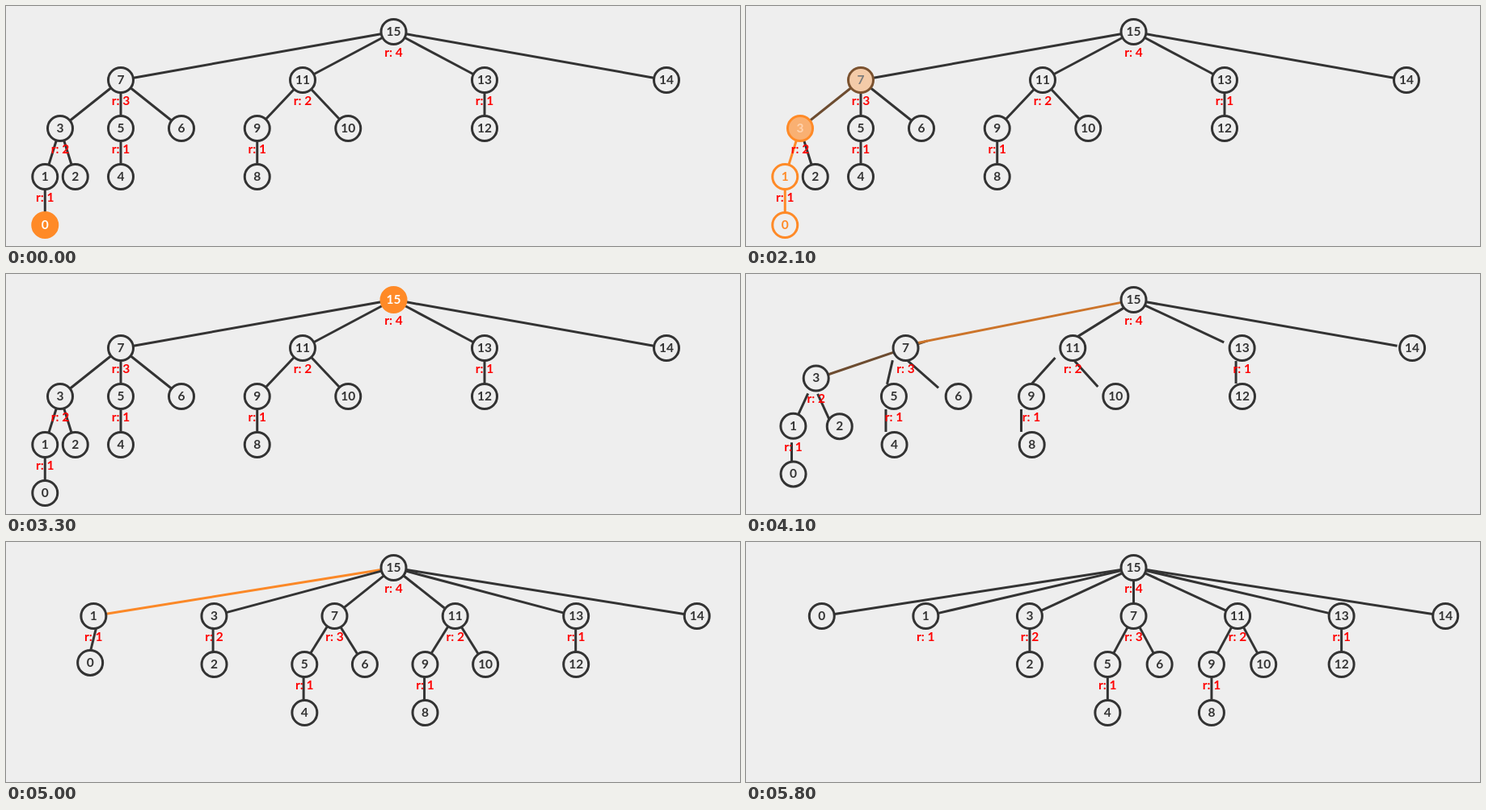
Write an HTML page that moves like this. It is 908 px wide and 298 px high and loops after 6.6 s.

```html
<!DOCTYPE html>
<html lang="en">
<head>
<meta charset="utf-8">
<title>Path compression</title>
<style>
  html, body { margin: 0; width: 100%; height: 100%; overflow: hidden; background: #eee; }
  svg { display: block; width: 908px; height: 298px; }
  circle, line { stroke-width: 3; }
  text { font: bold 15.5px Lato, "Open Sans", sans-serif; text-anchor: middle; }
  .rank { fill: #f00; }
</style>
</head>
<body>
<svg id="stage" viewBox="0 0 908 298"></svg>
<script>
const LOOP = 6600, TICK = 100;
const STEP = 500, FIRST = 421, DURATION = 388;
const ROOT = 15, LEFT = 29.5, WIDTH = 900, TOP = 32, ROW = 60, RADIUS = 16;
const PATH = [0, 1, 3, 7, ROOT];
const RANKS = { 1: 1, 3: 2, 5: 1, 7: 3, 9: 1, 11: 2, 13: 1, 15: 4 };

const PAPER = [238, 238, 238], INK = [51, 51, 51], ORANGE = [255, 138, 39], WHITE = [255, 255, 255];
const NORMAL = { fill: PAPER, stroke: INK, text: INK };
const VISITED = { fill: PAPER, stroke: ORANGE, text: ORANGE };
const ACTIVE = { fill: ORANGE, stroke: ORANGE, text: WHITE };

// Every child gets an equal share of its parent's width.
function layout(parents) {
  const spots = [];
  (function place(id, left, width, depth) {
    spots[id] = [left + width / 2, TOP + ROW * depth];
    const children = [...parents.keys()].filter(child => parents[child] === id);
    const share = width / children.length;
    children.forEach((child, i) => place(child, left + i * share, share, depth + 1));
  })(ROOT, LEFT, WIDTH, 0);
  return spots;
}

function edgeBetween([x1, y1], [x2, y2]) {
  const length = Math.hypot(x2 - x1, y2 - y1);
  const dx = (x2 - x1) / length * RADIUS, dy = (y2 - y1) / length * RADIUS;
  return [x1 + dx, y1 + dy, x2 - dx, y2 - dy];
}

function makeStep(parents, active, visited, hotEdges) {
  const spots = layout(parents);
  return {
    nodes: spots.map((at, id) => ({
      at, ...(id === active ? ACTIVE : visited.includes(id) ? VISITED : NORMAL)
    })),
    edges: parents.map((parent, id) => ({
      ends: edgeBetween(spots[id], spots[parent]),
      color: hotEdges.includes(id) ? ORANGE : INK
    }))
  };
}

function makeSteps() {
  const parents = [1, 3, 3, 7, 5, 7, 7, 15, 9, 11, 11, 15, 13, 15, 15];
  const steps = PATH.map((id, i) => {
    const seen = PATH.slice(0, i);
    return makeStep(parents, id, seen, seen);
  });
  steps.push(makeStep(parents, ROOT, [], []));
  for (const id of [7, 3, 1, 0]) {
    parents[id] = ROOT;
    steps.push(makeStep(parents, null, [], [id]));
  }
  steps.push(makeStep(parents, null, [], []));
  return steps;
}

const stage = document.getElementById("stage");
function add(tag, attributes = {}, content = "") {
  const element = document.createElementNS(stage.namespaceURI, tag);
  set(element, attributes);
  element.textContent = content;
  return stage.appendChild(element);
}
function set(element, attributes) {
  for (const name in attributes) element.setAttribute(name, attributes[name]);
}

const steps = makeSteps();
const lines = steps[0].edges.map(() => add("line"));
const nodes = steps[0].nodes.map((_, id) => ({
  circle: add("circle", { r: 15.5 }),
  number: add("text", {}, id)
}));
const ranks = Object.entries(RANKS).map(([id, rank]) => ({
  id, label: add("text", { class: "rank" }, `r: ${rank}`)
}));

const cubicInOut = u => u < 0.5 ? 4 * u ** 3 : 1 - 4 * (1 - u) ** 3;
const ease = elapsed => cubicInOut(Math.min(1, Math.max(0, elapsed / DURATION)));
const mix = (a, b, p) => a.map((value, i) => value + (b[i] - value) * p);
const rgb = (a, b, p) => `rgb(${mix(a, b, p).map(Math.round)})`;

function draw(time) {
  const index = Math.max(1, Math.floor((time - FIRST) / STEP));
  const last = Math.min(index, steps.length - 1);
  const from = steps[last - 1], to = steps[last];
  const elapsed = time - FIRST - last * STEP;

  // Elements start one after another, edges a little behind the nodes.
  lines.forEach((line, id) => {
    const a = from.edges[id], b = to.edges[id];
    const p = ease(elapsed - 13 - 1.75 * id);
    const [x1, y1, x2, y2] = mix(a.ends, b.ends, p);
    set(line, { x1, y1, x2, y2, stroke: rgb(a.color, b.color, p) });
  });

  const spots = nodes.map(({ circle, number }, id) => {
    const a = from.nodes[id], b = to.nodes[id];
    const p = ease(elapsed - 0.9 * id);
    const [x, y] = mix(a.at, b.at, p);
    set(circle, { cx: x, cy: y, fill: rgb(a.fill, b.fill, p), stroke: rgb(a.stroke, b.stroke, p) });
    set(number, { x, y: y + 5, fill: rgb(a.text, b.text, p) });
    return [x, y];
  });

  for (const { id, label } of ranks) set(label, { x: spots[id][0], y: spots[id][1] + 31 });
}

const start = performance.now();
function frame() {
  const time = (performance.now() - start) % LOOP;
  draw(Math.floor(time / TICK) * TICK);
  requestAnimationFrame(frame);
}
frame();
</script>
</body>
</html>
```
